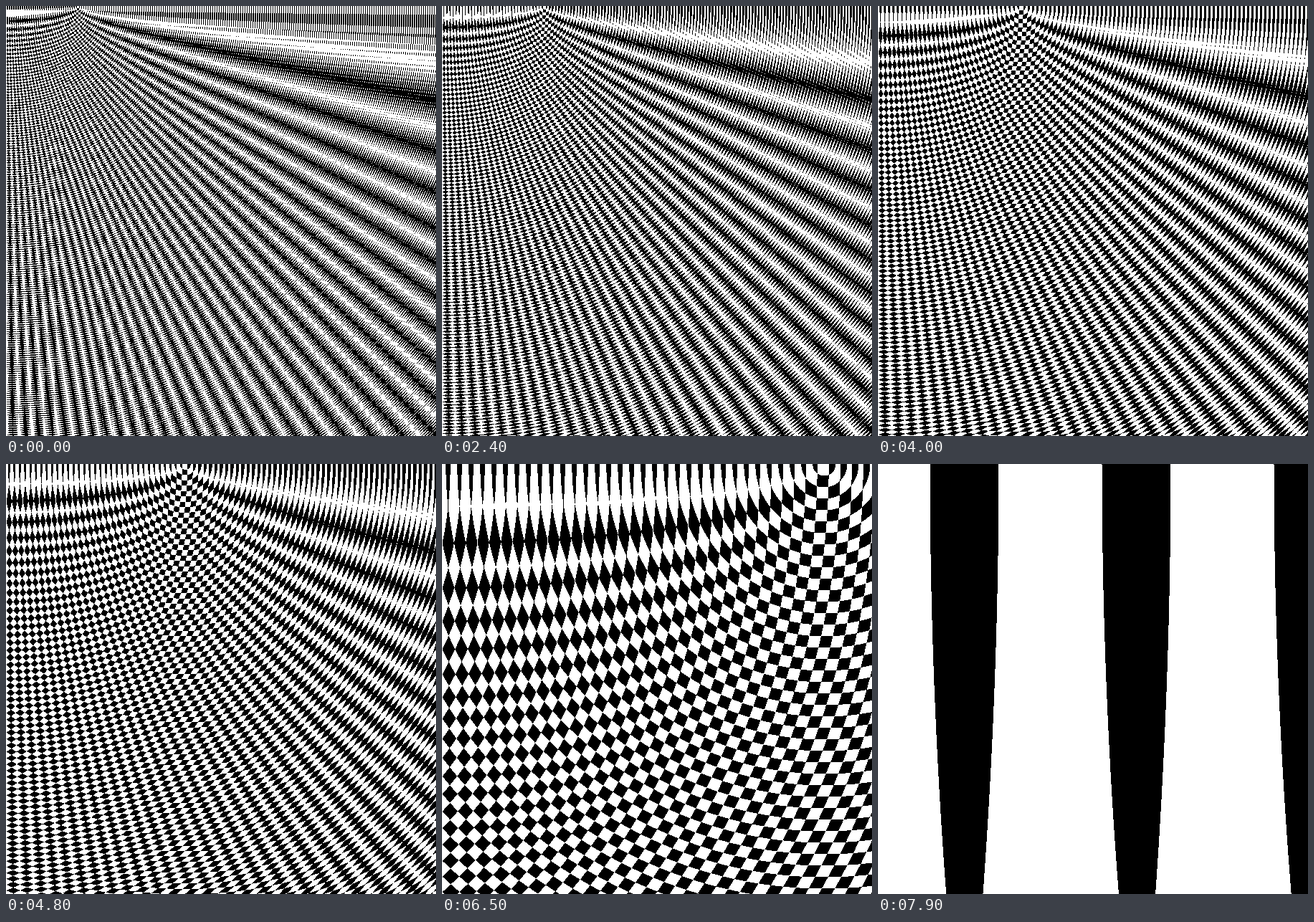
Recreate the animation shown at these times as an HTML page with a canvas. Size 600x600 px, loop 8000 ms.

```html
<!DOCTYPE html>
<html lang="en">
<head>
<meta charset="utf-8">
<title>Ring interference</title>
<style>
  html, body { margin: 0; width: 100%; height: 100%; overflow: hidden; background: #fff; }
  canvas { display: block; width: 600px; height: 600px; image-rendering: pixelated; }
</style>
</head>
<body>
<canvas id="stage" width="600" height="600"></canvas>
<script>
  const SIZE = 600;
  const STEPS = 80;
  const STEP_MS = 100;
  const FOCUS = 33.3;   // distance of each ring centre from the origin, in ring widths
  const RING_PX = 3;    // ring width at the widest view
  const WHITE = 0xffffffff;
  const BLACK = 0xff000000;

  const ctx = document.getElementById('stage').getContext('2d');
  const image = ctx.createImageData(SIZE, SIZE);
  const pixels = new Uint32Array(image.data.buffer);

  // Two sets of concentric rings combined by parity; the view closes in on the origin.
  function draw(step) {
    const unit = (STEPS - step) / (STEPS * RING_PX);
    let i = 0;
    for (let y = 0; y < SIZE; y++) {
      const v2 = (y * unit) ** 2;
      for (let x = 0; x < SIZE; x++) {
        const a = x * unit - FOCUS;
        const b = x * unit + FOCUS;
        const near = Math.sqrt(a * a + v2);
        const far = Math.sqrt(b * b + v2);
        pixels[i++] = (near ^ far) & 1 ? BLACK : WHITE;
      }
    }
    ctx.putImageData(image, 0, 0);
  }

  let shown = -1;
  function tick() {
    const step = Math.floor(performance.now() / STEP_MS) % STEPS;
    if (step !== shown) {
      shown = step;
      draw(step);
    }
    requestAnimationFrame(tick);
  }
  tick();
</script>
</body>
</html>
```
